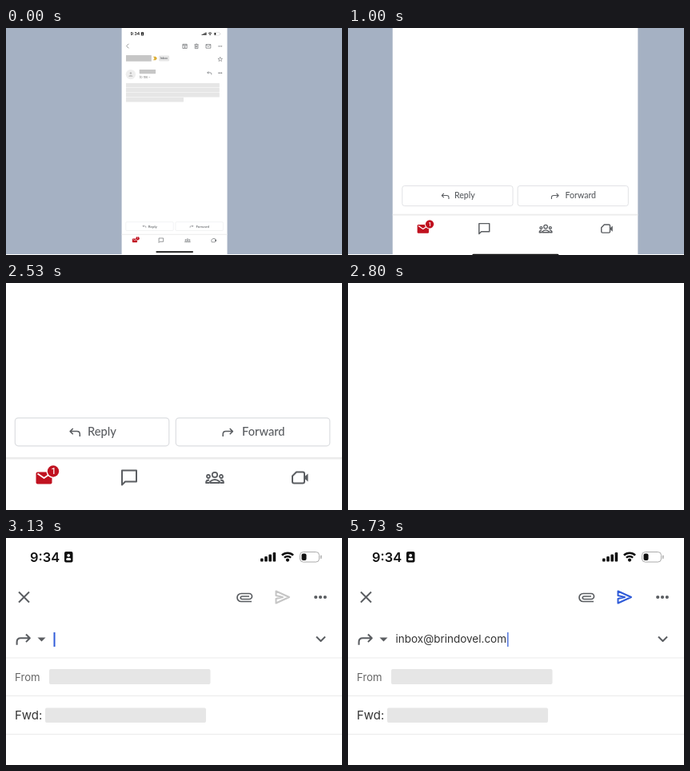
Recreate the animation shown at these times as an HTML page with a canvas. Size 420 by 284 pixels, loop 6.67 s.

```html
<!DOCTYPE html>
<html lang="en">
<head>
<meta charset="utf-8">
<title>Forward an email</title>
<style>
html, body { margin: 0; width: 100%; height: 100%; overflow: hidden; background: #fff; }
canvas { display: block; width: 420px; height: 284px; }
</style>
</head>
<body>
<canvas id="stage" width="420" height="284"></canvas>
<script>
const ctx = document.getElementById('stage').getContext('2d');
ctx.lineJoin = 'round';
const LOOP = 6670, FPS = 15;
const PHONE = { x: 146.3, scale: 0.309, left: -5.5, width: 427, height: 925 };
const SCROLL = 619;
const ADDRESS = 'inbox@brindovel.com';
const INK = '#5a5d61', DARK = '#333', BAR = '#e6e6e6', RED = '#c0111f', BLUE = '#2f5bd8';

function ease(f, start, end) {
  const p = Math.min(1, Math.max(0, (f - start) / (end - start)));
  return 0.5 - 0.5 * Math.cos(Math.PI * p);
}

function rect(x, y, w, h, color, r = 0) {
  ctx.fillStyle = color;
  ctx.beginPath();
  ctx.roundRect(x, y, w, h, r);
  ctx.fill();
}

function dot(x, y, r, color) {
  ctx.fillStyle = color;
  ctx.beginPath();
  ctx.arc(x, y, r, 0, Math.PI * 2);
  ctx.fill();
}

// y is the middle of the capital letters
function text(str, x, y, size, color = DARK, weight = 400, family = 'Inter, sans-serif') {
  ctx.font = `${weight} ${size}px ${family}`;
  ctx.fillStyle = color;
  ctx.fillText(str, x, y + size * 0.355);
}

function icon(d, x, y, { color = INK, width = 2, fill = false, sx = 1, sy = 1 } = {}) {
  ctx.save();
  ctx.translate(x, y);
  ctx.scale(sx, sy);
  const path = new Path2D(d);
  ctx.strokeStyle = ctx.fillStyle = color;
  ctx.lineWidth = width;
  if (fill) ctx.fill(path); else ctx.stroke(path);
  ctx.restore();
}

const ARROW = 'M-7 6V3Q-7-1-3-1H6.5M2.5-5L6.5-1L2.5 3';
const CHEVRON = 'M-5.5-3L0 2.5L5.5-3';
const circle = (x, y, r) => `M${x - r} ${y}a${r} ${r} 0 1 0 ${2 * r} 0a${r} ${r} 0 1 0 ${-2 * r} 0`;

function dots(x, y) {
  for (const dx of [-5.8, 0, 5.8]) dot(x + dx, y, 2.1, INK);
}

function statusBar() {
  text('9:34', 30, 23.7, 16.4, '#111', 600);
  rect(73, 17, 10.5, 13.5, '#111', 2);
  dot(78.2, 21.8, 1.9, '#fff');
  rect(75.2, 25, 6, 3, '#fff', 1.5);
  for (let i = 0; i < 4; i++) rect(318 + i * 5.2, 25.5 - i * 2.5, 3.6, 4 + i * 2.5, '#111', 1);
  for (const r of [10, 5.8]) {
    ctx.strokeStyle = '#111';
    ctx.lineWidth = 2.5;
    ctx.beginPath();
    ctx.arc(352, 28.8, r, -Math.PI * 0.75, -Math.PI * 0.25);
    ctx.stroke();
  }
  dot(352, 27.6, 2.1, '#111');
  ctx.strokeStyle = '#aaa';
  ctx.lineWidth = 1;
  ctx.beginPath();
  ctx.roundRect(367.5, 17.5, 24, 12.5, 4);
  ctx.stroke();
  rect(369.5, 19.5, 6, 8.5, '#111', 2);
  rect(393, 21.5, 1.5, 4.5, '#aaa', 1);
}

function button(x, label, iconX, textX, flip) {
  ctx.strokeStyle = '#dcdee1';
  ctx.lineWidth = 1.2;
  ctx.beginPath();
  ctx.roundRect(x, 785.3, 192.5, 35, 4);
  ctx.stroke();
  icon(ARROW, iconX, 803, { sx: 0.9 * flip, sy: 0.9, width: 1.7 });
  text(label, textX, 802.4, 14.7, INK, 500, 'Lato, sans-serif');
}

function navBar() {
  rect(PHONE.left, 834.5, PHONE.width, 2.5, '#ebebeb');
  rect(37.5, 853, 20, 15, RED, 2);
  icon('M-8-5L0 0.5L8-5', 47.5, 860, { color: '#fff', width: 1.8 });
  dot(59, 852, 8.6, '#fff');
  dot(59, 852, 7.2, RED);
  text('1', 56.6, 852, 10.5, '#fff', 500, 'Roboto, sans-serif');
  icon('M-9 9V-9H9V5H-5Z', 154, 860);
  icon(circle(0, -3.5, 3.2) + circle(-8, -1.5, 2) + circle(8, -1.5, 2) +
    'M-6 6.5V5Q0 0 6 5V6.5ZM-7 3Q-11 3-11 6.5H-7M7 3Q11 3 11 6.5H7', 261, 860, { width: 1.8 });
  icon('M-4-7H4Q6-7 6-5V5Q6 7 4 7H-7Q-9 7-9 5V-2Z', 367, 860);
  icon('M6-1L10.5-5V5L6 1Z', 367, 860, { fill: true });
  rect(133, 904, 151, 5, '#111', 2.5);
}

function inboxScreen() {
  rect(PHONE.left, 0, PHONE.width, PHONE.height, '#fff');
  statusBar();
  icon('M5-9L-4 0L5 9', 18, 73);
  icon('M-8.5-8.5H8.5V8.5H-8.5ZM-8.5-4.5H8.5M0-2V5M-3.5 2L0 5.5L3.5 2', 250, 74);
  icon('M-8-7H8M-3-9H3M-6-7V9H6V-7M-2-3V5M2-3V5', 297, 74);
  icon('M-9.5-7.5H9.5V7.5H-9.5ZM-9-6L0 1L9-6', 345, 74);
  dots(393, 74);

  rect(12, 110, 103, 25, '#c6c6c6', 1);
  icon('M-8-7H2L8 0L2 7H-8L-3 0Z', 130, 123, { color: '#dcae35', fill: true });
  rect(145, 112, 42, 22, '#e6e6e6', 4);
  text('Inbox', 150, 123, 11.6, INK, 500);
  const star = Array.from({ length: 10 }, (_, i) => {
    const r = i % 2 ? 4 : 9.5, a = i * Math.PI / 5;
    return `${r * Math.sin(a)} ${-r * Math.cos(a)}`;
  });
  icon(`M${star.join('L')}Z`, 393, 127, { width: 1.6 });

  dot(31, 188, 20, '#eeeeee');
  dot(31, 183, 4, '#bbb');
  icon('M-8 8V5Q0-1 8 5V8Z', 31, 189, { color: '#bbb', fill: true });
  rect(66, 168, 66, 17, '#c6c6c6', 2);
  text('to me', 67, 198, 12.6, '#777');
  icon(CHEVRON, 107, 199, { color: '#777', width: 2.4, sx: 0.5, sy: 0.5 });
  icon(ARROW, 349, 182, { sx: -1.2, sy: 1.2, width: 1.7 });
  dots(393, 182);
  for (let i = 0; i < 4; i++) rect(12, 223 + i * 19.4, i < 3 ? 378 : 233, 18.2, BAR, 1);

  button(11.3, 'Reply', 86, 102, -1);
  button(212.3, 'Forward', 277.5, 295, 1);
  navBar();
}

function composeScreen(f, typed) {
  rect(PHONE.left, 0, PHONE.width, PHONE.height, '#fff');
  statusBar();
  icon('M-6.5-6.5L6.5 6.5M6.5-6.5L-6.5 6.5', 22.5, 74);
  icon('M9 5H-4A5 5 0 0 1-4-5H6A3.5 3.5 0 0 1 6 2H-3A1.6 1.6 0 0 1-3-1.5H6', 298, 74.5, { width: 1.7 });
  icon('M-7.5-7.5L9 0L-7.5 7.5V2L1 0L-7.5-2Z', 345, 74, { color: typed >= 1 ? BLUE : '#c5c5c5' });
  dots(393, 74);

  icon(ARROW, 22, 126.5, { sx: 1.2, sy: 1.2, width: 1.7 });
  icon('M-5-2.5H5L0 2.5Z', 44.5, 127, { fill: true });
  icon(CHEVRON, 393.5, 126.5);
  ctx.save();
  ctx.beginPath();
  ctx.rect(0, 110, 60 + (typed < 1 ? 140 * typed : 200), 34);
  ctx.clip();
  if (typed > 0) text(ADDRESS, 59.5, 126.5, 13.5);
  ctx.restore();
  if (f < 60) rect(59.5, 118, 2, 18, BLUE);
  if (typed >= 1) rect(199, 118, 1.6, 18, '#5f80e0');

  for (const y of [150, 197.5, 245.5]) rect(0, y - 0.5, 420, 1, '#ebebeb');
  text('From', 11, 174, 13.2, '#666');
  rect(54, 164, 201.5, 19, BAR, 2);
  text('Fwd:', 11, 222, 15);
  rect(49, 212.5, 201, 18.5, BAR, 2);
  text('-'.repeat(10), 11, 308, 15.6);
  text('Forwarded message', 87, 308, 15.2);
  text('-'.repeat(9), 238, 308, 15.6);
  text('From:', 11, 328, 15.1);
  rect(54, 318, 304, 19, BAR, 2);
  text('Date:', 11, 348, 15.1);
  rect(51, 338, 304.5, 18.5, BAR, 2);
}

function tap(f, x, y, start, end) {
  const p = (f - start + 1) / (end - start + 1);
  if (p <= 0 || p >= 1) return;
  ctx.globalAlpha = 0.35 * Math.sin(Math.PI * p);
  dot(x, y, 25, '#7f8aa0');
  ctx.globalAlpha = 1;
}

function draw(f) {
  const zoom = ease(f, 11.2, 18);
  const pan = f >= 47 ? 1 : ease(f, 37.56, 48.45);
  const typed = f >= 72 ? 1 : ease(f, 60.2, 73.4);
  const scale = PHONE.scale + (1 - PHONE.scale) * zoom;

  rect(0, 0, 420, 284, '#fff');
  rect(0, 0, 420, 283, '#a5b1c3');
  ctx.save();
  ctx.translate(PHONE.x * (1 - zoom), -SCROLL * (zoom - pan));
  ctx.scale(scale, scale);
  if (pan < 1) inboxScreen();
  if (pan > 0) {
    ctx.globalAlpha = pan;
    composeScreen(f, typed);
  }
  ctx.restore();
  tap(f, 319, 184, 25, 28);
  tap(f, 344, 74, 79, 86);
}

const began = performance.now();
function tick() {
  const t = (performance.now() - began) % LOOP;
  draw(Math.floor((t + 5) * FPS / 1000) % 100);
  requestAnimationFrame(tick);
}
tick();
</script>
</body>
</html>
```
